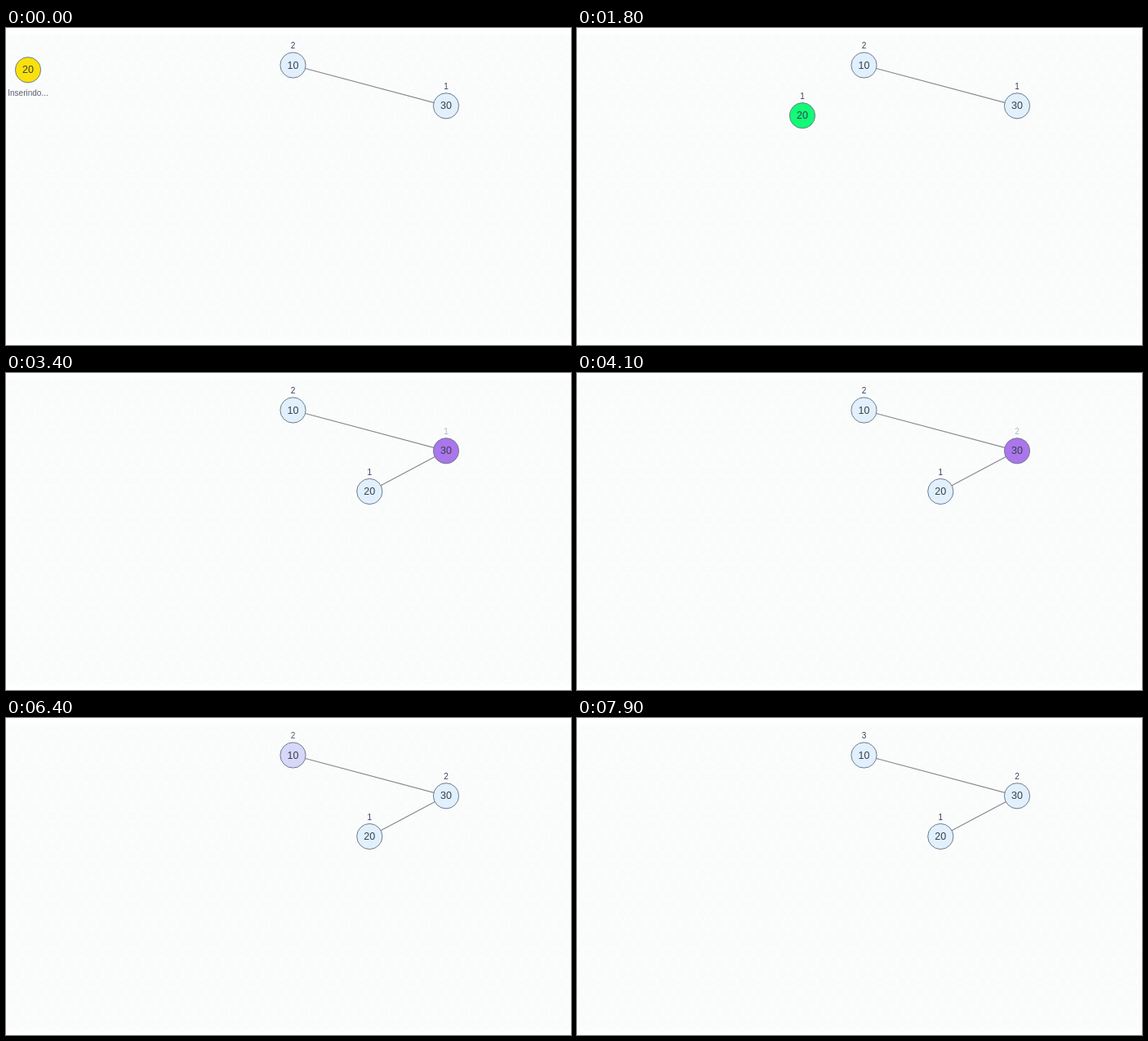
Recreate the animation shown at these times as an HTML page. Size 692 by 388 pixels, loop 8000 ms.

```html
<!DOCTYPE html>
<html lang="pt">
<head>
<meta charset="utf-8">
<title>Inserção em árvore</title>
<style>
  html, body { margin: 0; width: 100%; height: 100%; overflow: hidden; background: #fdfefe; }
  svg { display: block; width: 692px; height: 388px; }

  text { font-family: "Liberation Sans", Arial, sans-serif; text-anchor: middle; }
  .key { font-size: 12.5px; fill: #36424c; }
  .height, .note { font-size: 10px; fill: #3c3d60; }
  .note { fill: #5c5e72; }
  .edge { stroke: #85898d; stroke-width: 1.2; }
  circle { fill: var(--idle); stroke: #6c7c8b; stroke-width: 1; }

  :root { --idle: #e1f0fc; --visit: #8a2be2; --fresh: #12fa76; --wait: #fae10c; }

  /* One loop is 8 s, so 1.25% is a tenth of a second. */
  .anim { animation: 8s step-end infinite; }
  .new-node { animation-name: travel; }
  .new-disc { animation-name: new-fill; }
  .new-height { animation-name: show-at-insert; }
  .note { animation-name: hide-at-insert; }
  .new-edge { animation-name: show-at-link; }
  .right-disc { animation-name: right-fill; }
  .right-old { animation-name: right-out; }
  .right-new { animation-name: right-in; }
  .root-disc { animation-name: root-fill; }
  .root-old { animation-name: root-out; }
  .root-new { animation-name: root-in; }

  @keyframes travel {
    0%     { transform: translate(27px, 51.3px); }
    17.5%  { transform: translate(41.2px, 54.6px); }
    18.75% { transform: translate(79px, 63px); }
    20%    { transform: translate(136px, 75.7px); }
    21.25% { transform: translate(204px, 91px); }
    22.5%  { transform: translate(276px, 107.2px); }
    23.75% { transform: translate(345px, 122.5px); }
    25%    { transform: translate(399px, 134.6px); }
    26.25% { transform: translate(434px, 142.4px); }
    27.5%, 100% { transform: translate(445.3px, 145px); }
  }
  @keyframes new-fill {
    0% { fill: var(--wait); }
    17.5% { fill: var(--fresh); }
    37.5%, 100% { fill: var(--idle); }
  }
  @keyframes show-at-insert { 0% { opacity: 0; } 17.5%, 100% { opacity: 1; } }
  @keyframes hide-at-insert { 0% { opacity: 1; } 17.5%, 100% { opacity: 0; } }
  @keyframes show-at-link { 0% { opacity: 0; } 37.5%, 100% { opacity: 1; } }

  @keyframes right-fill {
    0% { fill: var(--idle); stroke-width: 1; }
    1.25% { fill: var(--idle); stroke-width: 1.6; }
    7.5% { fill: var(--idle); stroke-width: 1; }
    37.5% { fill: var(--idle); stroke-width: 1; animation-timing-function: steps(8, start); }
    47.5% { fill: var(--visit); stroke-width: 1; }
    48.75% { fill: var(--visit); stroke-width: 1; animation-timing-function: steps(8, start); }
    58.75%, 100% { fill: var(--idle); stroke-width: 1; }
  }
  @keyframes right-out {
    0% { opacity: 1; }
    37.5% { opacity: 1; animation-timing-function: steps(8, start); }
    47.5%, 100% { opacity: 0; }
  }
  @keyframes right-in {
    0% { opacity: 0; }
    48.75% { opacity: 0; animation-timing-function: steps(8, start); }
    58.75%, 100% { opacity: 1; }
  }

  @keyframes root-fill {
    0% { fill: var(--idle); }
    80% { fill: var(--idle); animation-timing-function: steps(8, start); }
    90% { fill: var(--visit); }
    91.25% { fill: var(--visit); animation-timing-function: steps(7, start); }
    100% { fill: var(--idle); }
  }
  @keyframes root-out {
    0% { opacity: 1; }
    80% { opacity: 1; animation-timing-function: steps(8, start); }
    90%, 100% { opacity: 0; }
  }
  @keyframes root-in {
    0% { opacity: 0; }
    91.25% { opacity: 0; animation-timing-function: steps(7, start); }
    100% { opacity: 1; }
  }
</style>
</head>
<body>
<svg viewBox="0 0 692 388">
  <defs>
    <pattern id="weave" width="14" height="24" patternUnits="userSpaceOnUse">
      <path d="M7 0V4L0 8V16L7 20V24M7 4L14 8V16L7 20" fill="none" stroke="#fdfefe" stroke-width="1.2"/>
    </pattern>
  </defs>
  <rect y="8" width="692" height="373" fill="#fafcfb"/>
  <rect y="8" width="692" height="373" fill="url(#weave)"/>

  <line class="edge" x1="351.5" y1="45.5" x2="539" y2="95.3"/>
  <line class="edge anim new-edge" x1="539" y1="95.3" x2="445.3" y2="145"/>

  <g transform="translate(351.5 45.5)">
    <circle class="anim root-disc" r="15.6"/>
    <text class="key" y="4">10</text>
    <text class="height anim root-old" y="-20.5">2</text>
    <text class="height anim root-new" y="-20.5">3</text>
  </g>

  <g transform="translate(539 95.3)">
    <circle class="anim right-disc" r="15.6"/>
    <text class="key" y="4">30</text>
    <text class="height anim right-old" y="-20.5">1</text>
    <text class="height anim right-new" y="-20.5">2</text>
  </g>

  <g class="anim new-node">
    <circle class="anim new-disc" r="15.6"/>
    <text class="key" y="4">20</text>
    <text class="height anim new-height" y="-20.5">1</text>
    <text class="note anim" y="31.5">Inserindo...</text>
  </g>
</svg>
</body>
</html>
```
